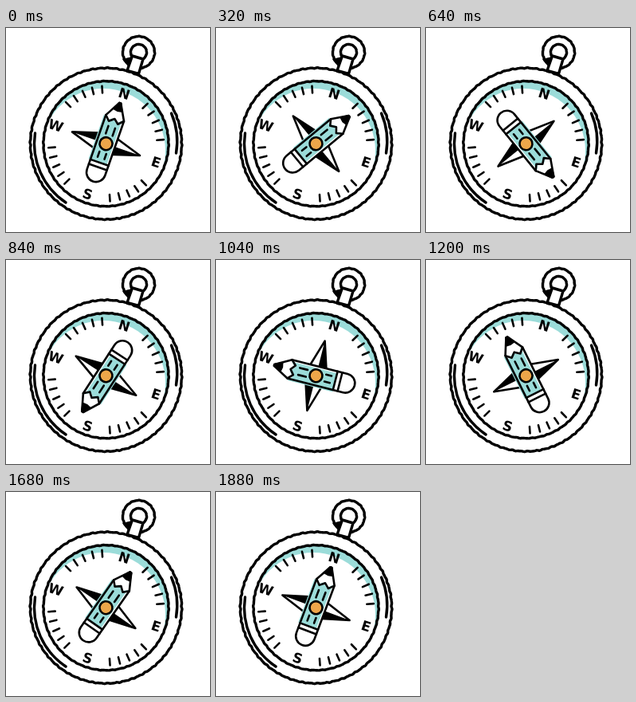
An HTML page for the animation above (1.92 s loop, 256 by 256 pixels).

```html
<!DOCTYPE html>
<html lang="en">
<head>
<meta charset="utf-8">
<title>Compass</title>
<style>
html, body { margin: 0; width: 100%; height: 100%; overflow: hidden; background: #fff; }
svg { display: block; width: 100vw; height: 100vh; }
.ink { stroke: #000; stroke-width: 3.4; stroke-linecap: round; stroke-linejoin: round; }
.fine { stroke-width: 2.6; }
.teal { fill: #9bdcd9; }
text { font: bold 17px "DejaVu Sans", Inter, sans-serif; text-anchor: middle; }
</style>
</head>
<body>
<svg viewBox="0 0 256 256" fill="none">
  <defs>
    <clipPath id="dial"><circle cx="125.5" cy="145" r="78"/></clipPath>
  </defs>

  <!-- Ring -->
  <path id="ringOut" class="ink" fill="#fff"/>
  <path id="ringIn" class="ink" fill="#fff"/>

  <!-- Case and dial -->
  <path id="caseOut" class="ink" fill="#fff"/>
  <g clip-path="url(#dial)">
    <circle class="teal" cx="125.5" cy="145" r="78"/>
    <circle cx="122" cy="154" r="78" fill="#fff"/>
  </g>
  <path id="caseIn" class="ink"/>
  <path class="ink" d="M36.500 132A89 89 0 0 0 75 219M207.500 107A89 89 0 0 1 213.500 157"/>
  <g id="ticks" class="ink fine"></g>
  <g id="letters" fill="#000"></g>

  <!-- Stem -->
  <path fill="#000" d="M146 39L158 36L154 49Z"/>
  <path class="ink" fill="#fff" d="M158.500 35L172 39L166.500 57.500L152 53.500Z"/>

  <!-- Needle and pencil -->
  <g id="hand">
    <path class="ink fine" fill="#fff" d="M-45 0L0 -14L45 0L0 14Z"/>
    <path fill="#000" d="M-45 0L0 -14V0ZM45 0L0 14V0Z"/>
    <path fill="#fff" d="M-12 -34L0 -54L12 -34V38A12 12 0 0 1 -12 38Z"/>
    <path class="teal" d="M-14.500 -34L-9 -28L-2.500 -33L4 -28L9.500 -34V25H-14.500Z"/>
    <path class="ink fine" d="M-12 -34L-1 -54H1L12 -34V38A12 12 0 0 1 -12 38Z"/>
    <path class="ink fine" d="M-12 -34L-6 -28L0 -33L6 -28L12 -34M-12 25H12M-12 31H12"/>
    <path class="ink fine" fill="#000" d="M-5 -45L-1 -54H1L5 -45L0 -44Z"/>
    <path class="ink fine" d="M-4.500 -22V-12M4.500 -22V-12M-4.500 12V19M4.500 12V19"/>
    <circle class="ink fine" r="8" fill="#eda64a"/>
  </g>
</svg>
<script>
const LOOP = 1920, STEP = 40, DELAY = 20, SWING = 1610;
const START = 19, OVER = 396, END = START + 360;
const CX = 125.5, CY = 145.2;
const byId = id => document.getElementById(id);

// Closed circle with a slight hand-drawn wobble.
function rough(id, cx, cy, r, amp, waves) {
  let d = "";
  for (let i = 0; i < 360; i++) {
    const a = i * Math.PI / 180;
    const s = r + amp * (Math.sin(waves * a) + 0.6 * Math.sin(1.6 * waves * a));
    d += (i ? "L" : "M") + (cx + s * Math.cos(a)).toFixed(2) + " " + (cy + s * Math.sin(a)).toFixed(2);
  }
  byId(id).setAttribute("d", d + "Z");
}
rough("ringOut", 166.5, 30.5, 20, 0.2, 15);
rough("ringIn", 166.5, 30.5, 10, 0.1, 10);
rough("caseOut", CX, CY, 95, 0.35, 60);
rough("caseIn", CX, CY, 78.5, 0.25, 50);

let ticks = "", letters = "";
["N", "E", "S", "W"].forEach((name, q) => {
  for (let i = -2; i <= 2; i++) {
    ticks += `<path d="M0 -72.500V-64" transform="translate(${CX} ${CY}) rotate(${q * 90 - 24 + i * 10})"/>`;
  }
  const a = (q * 90 + 20) * Math.PI / 180;
  const x = CX + 67 * Math.sin(a), y = CY - 67 * Math.cos(a);
  letters += `<text y="6.2" transform="translate(${x} ${y}) rotate(18)">${name}</text>`;
});
byId("ticks").innerHTML = ticks;
byId("letters").innerHTML = letters;

const ease = p => (1 - Math.cos(Math.PI * p)) / 2;

// One full turn that overshoots, then settles back.
function angle(time) {
  const t = (time - DELAY + LOOP) % LOOP;
  return t < SWING
    ? START + (OVER - START) * ease(t / SWING)
    : OVER + (END - OVER) * ease((t - SWING) / (LOOP - SWING));
}

const begin = performance.now();
function draw() {
  const t = (performance.now() - begin + 1) % LOOP;
  const held = Math.floor(t / STEP) * STEP;
  byId("hand").setAttribute("transform", `translate(${CX} ${CY}) rotate(${angle(held)})`);
  requestAnimationFrame(draw);
}
draw();
</script>
</body>
</html>
```
